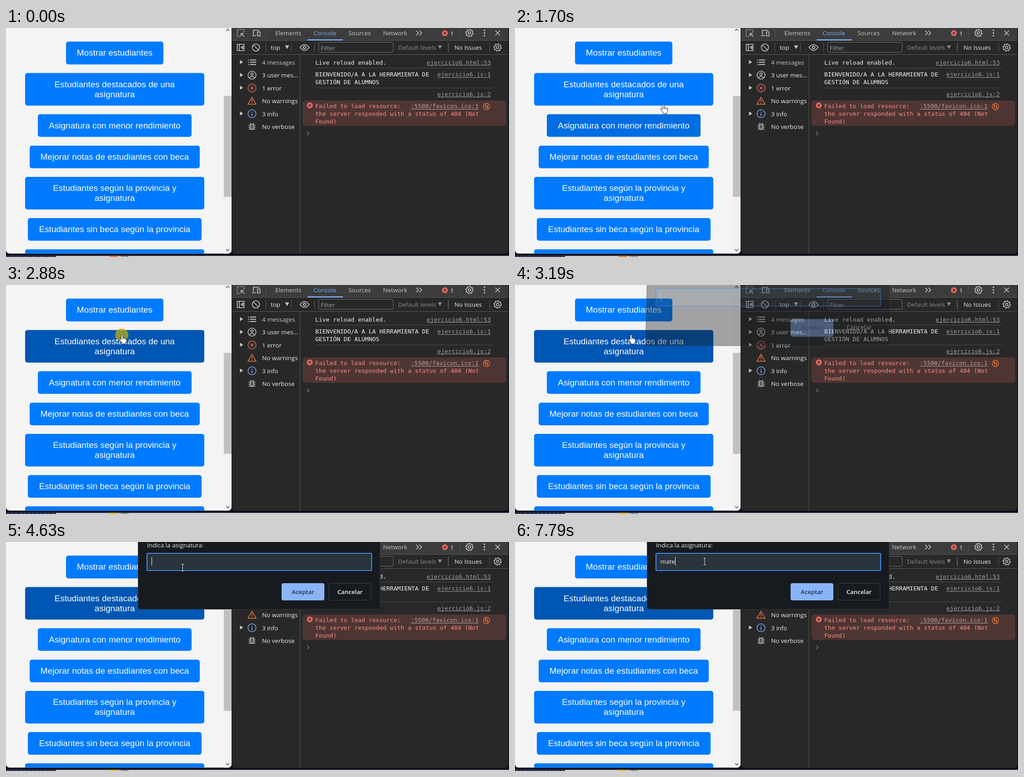
These frames come from a looping animation (1106 by 506 pixels, 8000 ms). An HTML page with a canvas:

```html
<!DOCTYPE html>
<html lang="es">
<head>
<meta charset="utf-8">
<title>Consola</title>
<style>
  html, body { margin: 0; width: 100%; height: 100%; overflow: hidden; background: #0b1020; }
  canvas { display: block; }
</style>
</head>
<body>
<canvas id="stage" width="1106" height="506"></canvas>
<script>
const ctx = document.getElementById('stage').getContext('2d', { alpha: false });
const LOOP = 8000;
const PAGE = '18.95px "Liberation Sans", Arial, sans-serif';
const UI = '13.4px "Open Sans", "Noto Sans", sans-serif';
const UI_BOLD = '600 13.2px "Open Sans", "Noto Sans", sans-serif';
const MONO = '13px "DejaVu Sans Mono", "Noto Sans Mono", monospace';

const clamp = v => Math.min(1, Math.max(0, v));

// Linear interpolation through [time, ...values] keys.
function track(keys, t) {
  if (t <= keys[0][0]) return keys[0].slice(1);
  for (let i = 1; i < keys.length; i++) {
    const a = keys[i - 1], b = keys[i];
    if (t < b[0]) {
      const k = (t - a[0]) / (b[0] - a[0]);
      return a.slice(1).map((v, j) => v + (b[j + 1] - v) * k);
    }
  }
  return keys[keys.length - 1].slice(1);
}

function rect(x, y, w, h, color) {
  ctx.fillStyle = color;
  ctx.fillRect(x, y, w, h);
}

function rounded(x, y, w, h, r, fill, stroke, width = 1) {
  ctx.beginPath();
  ctx.roundRect(x, y, w, h, r);
  if (fill) { ctx.fillStyle = fill; ctx.fill(); }
  if (stroke) { ctx.strokeStyle = stroke; ctx.lineWidth = width; ctx.stroke(); }
}

function text(str, x, y, font, color, align = 'left') {
  ctx.font = font;
  ctx.fillStyle = color;
  ctx.textAlign = align;
  ctx.fillText(str, x, y);
}

function shape(d, x, y, { fill, stroke, width = 1.5 }) {
  const path = new Path2D(d);
  ctx.save();
  ctx.translate(x, y);
  if (fill) { ctx.fillStyle = fill; ctx.fill(path); }
  if (stroke) { ctx.strokeStyle = stroke; ctx.lineWidth = width; ctx.stroke(path); }
  ctx.restore();
}

function circle(x, y, r, fill, stroke, width = 1.5) {
  ctx.beginPath();
  ctx.arc(x, y, r, 0, Math.PI * 2);
  if (fill) { ctx.fillStyle = fill; ctx.fill(); }
  if (stroke) { ctx.strokeStyle = stroke; ctx.lineWidth = width; ctx.stroke(); }
}

/* ---------- page ---------- */

const buttons = [
  { x: 132, y: 30, w: 214, h: 50.5, lines: ['Mostrar estudiantes'] },
  { x: 42, y: 99.5, w: 394, h: 72, lines: ['Estudiantes destacados de una', 'asignatura'],
    hover: [[1700, 0], [2000, 1], [2060, 1], [2300, .25], [2360, .25], [2700, 1]] },
  { x: 70, y: 190.5, w: 338, h: 50, lines: ['Asignatura con menor rendimiento'],
    hover: [[1575, 0], [1690, .4], [1700, .38], [1810, 0]] },
  { x: 52, y: 260, w: 374, h: 50, lines: ['Mejorar notas de estudiantes con beca'] },
  { x: 42, y: 329, w: 394, h: 72, lines: ['Estudiantes según la provincia y', 'asignatura'] },
  { x: 48, y: 420, w: 382, h: 50, lines: ['Estudiantes sin beca según la provincia'] },
  { x: 42, y: 489, w: 394, h: 72, lines: [] }
];

function drawPage(t, cursor) {
  ctx.save();
  ctx.beginPath();
  ctx.roundRect(0, -10, 496, 508.5, [0, 0, 8, 8]);
  ctx.clip();
  rect(0, 0, 496, 499, '#f4f4f4');
  for (const b of buttons) {
    const k = b.hover ? track(b.hover, t)[0] : 0;
    rounded(b.x, b.y, b.w, b.h, 5, `rgb(0,${123 - 37 * k},${255 - 76 * k})`);
    const middle = b.y + b.h / 2 + 6.2;
    b.lines.forEach((line, i) =>
      text(line, 239, middle + (i - (b.lines.length - 1) / 2) * 21.7, PAGE, '#fff', 'center'));
  }
  const onBar = t > 600 && t < 1200 && cursor.x > 479 && cursor.x < 496;
  rect(479, 0, 17, 499, '#f1f1f1');
  rect(479, 150, 17, 223, onBar ? '#a8a8a8' : '#c1c1c1');
  shape('M-3.5 2L0-1.5L3.5 2', 487.5, 4, { stroke: '#505050' });
  shape('M-3.5-2L0 1.5L3.5-2', 487.5, 491, { stroke: '#505050' });
  ctx.restore();
}

/* ---------- developer tools ---------- */

const INK = '#c7c7c7', BRIGHT = '#ececec', BLUE = '#7cacf8', LINE = '#5a5a5a', RED = '#e46962';
const ORANGE = '#ec7a3c';
const triangleDown = 'M-4.5-4H4.5L0 4Z';

function gear(x, y) {
  ctx.beginPath();
  for (let i = 0; i < 32; i++) {
    const r = i % 4 < 2 ? 8.3 : 6.4, a = (i + .5) * Math.PI / 16;
    ctx.lineTo(x + r * Math.cos(a), y + r * Math.sin(a));
  }
  ctx.closePath();
  ctx.strokeStyle = INK;
  ctx.lineWidth = 1.5;
  ctx.stroke();
  circle(x, y, 2.7, null, INK);
}

function errorBadge(x, y, r) {
  circle(x, y, r, RED);
  shape('M-2.5-2.5L2.5 2.5M2.5-2.5L-2.5 2.5', x, y, { stroke: '#332a2a', width: 1.4 });
}

function link(str, right, y, color) {
  text(str, right, y, MONO, color, 'right');
  const w = ctx.measureText(str).width;
  rect(right - w, Math.round(y + 1.5), w, 1, color);
}

function drawToolbars() {
  rect(497, 0, 608, 27, '#3c3c3c');
  rect(497, 27, 608, 1, LINE);
  rect(497, 58, 608, 1, LINE);

  const line = { stroke: INK, width: 1.6 };
  ctx.setLineDash([2.4, 2]);
  shape('M-1 7.5H-7.5V-7.5H7.5V-1', 516, 11, line);
  ctx.setLineDash([]);
  shape('M8 8L1 1M1 7V1H7', 516, 11, line);
  shape('M-6 4V-6H7M-9 6H0M3-2.5H8.5V6.5H3Z', 550, 11, line);
  rect(571, 2, 1, 18, LINE);
  text('Elements', 592, 16, UI, INK);
  text('Console', 676, 16, UI, BLUE);
  rect(663, 25, 78, 2.5, BLUE);
  text('Sources', 753, 16, UI, INK);
  text('Network', 829, 16, UI, INK);
  shape('M-6-5L-1 0L-6 5M1-5L6 0L1 5', 908, 11, line);
  errorBadge(965, 11.5, 6.5);
  text('1', 977, 16.5, UI, BRIGHT);
  rect(997, 2, 1, 18, LINE);
  gear(1019, 11);
  [-6, 0, 6].forEach(d => circle(1052, 11 + d, 1.7, INK));
  shape('M-5-5L5 5M5-5L-5 5', 1081, 11, line);

  shape('M-7.5-7H7.5V7H-7.5ZM-3-7V7M5-3L1 0L5 3Z', 516, 43, line);
  circle(549.5, 43, 8, null, INK, 1.6);
  shape('M-5.5-5.5L5.5 5.5', 549.5, 43, line);
  text('top', 582, 48, UI, BRIGHT);
  shape(triangleDown, 618, 42.5, { fill: INK });
  for (const x of [571, 627, 678, 1063]) rect(x, 33, 1, 20, LINE);
  rect(972, 33, 1, 20, '#858585');
  shape('M-10 0Q0-13 10 0Q0 13-10 0Z', 656.5, 43, line);
  circle(656.5, 43, 2.8, null, INK, 1.8);
  rounded(687.5, 31.5, 164, 22, 4, null, '#757575');
  text('Filter', 692, 48.5, UI, '#a0a0a0');
  text('Default levels', 862, 48, UI, '#8a8a8a');
  shape(triangleDown, 954, 42.5, { fill: '#8a8a8a' });
  text('No Issues', 986, 48, UI, BRIGHT);
  gear(1081, 43);
}

const sidebar = [
  ['4 messages', true, y => {
    for (const d of [-5, 0, 5]) {
      rect(532, y + d - 1, 2, 2, INK);
      rect(536, y + d - 1, 14, 2, INK);
    }
  }],
  ['3 user mes...', true, y => {
    circle(541, y, 8.8, null, INK);
    circle(541, y - 2.3, 2.7, null, INK);
    shape('M-6 6Q0-.5 6 6', 541, y, { stroke: INK });
  }],
  ['1 error', true, y => {
    circle(541, y, 8.8, null, RED);
    shape('M-3.3-3.3L3.3 3.3M3.3-3.3L-3.3 3.3', 541, y, { stroke: RED });
  }],
  ['No warnings', false, y => {
    shape('M0-8L9 7.5H-9ZM0-3V2.5M0 4V5.7', 541, y, { stroke: ORANGE });
  }],
  ['3 info', true, y => {
    circle(541, y, 8.8, null, BLUE);
    shape('M0-1V5M0-4.5V-2.7', 541, y, { stroke: BLUE, width: 1.8 });
  }],
  ['No verbose', false, y => {
    shape('M-3.5-3Q0-8 3.5-3V4Q0 9-3.5 4ZM-7.5-3.5H-3.5M3.5-3.5H7.5M-7.5 1H-3.5M3.5 1H7.5M-7.5 5.5H-3.5M3.5 5.5H7.5M-4-8L-2-5.5M4-8L2-5.5M-1.5-1H1.5M-1.5 3H1.5',
      541, y, { stroke: INK, width: 1.6 });
  }]
];

function drawConsole() {
  rect(646, 58, 1, 441, LINE);
  sidebar.forEach(([label, arrow, icon], i) => {
    const y = 75.7 + i * 28.45;
    if (arrow) shape('M-3-4.5L4 0L-3 4.5Z', 517.5, y - .5, { fill: INK });
    icon(y);
    text(label, 563, y + 5, UI, i ? BRIGHT : INK);
  });

  for (const y of [88, 132]) rect(680, y, 391, 1, '#4c4c4c');
  text('Live reload enabled.', 680, 80.5, MONO, '#f0f0f0');
  text('BIENVENIDO/A A LA HERRAMIENTA DE', 680, 107, MONO, '#f0f0f0');
  text('GESTIÓN DE ALUMNOS', 680, 123.8, MONO, '#f0f0f0');
  link('ejercicio6.html:53', 1066, 80.5, '#9e9e9e');
  link('ejercicio6.js:1', 1066, 107, '#9e9e9e');
  link('ejercicio6.js:2', 1066, 150.5, '#9e9e9e');

  rounded(652, 160, 448, 56, 6, '#4e3534');
  errorBadge(668, 171, 6.5);
  ['Failed to load resource:', 'the server responded with a status of 404 (Not', 'Found)']
    .forEach((s, i) => text(s, 680, 177 + i * 17, MONO, '#fa8c7f'));
  link(':5500/favicon.ico:1', 1039, 177, '#b3a3a2');
  circle(1056.5, 173.5, 7, null, ORANGE, 1.4);
  shape('M-2 3.5V-3.5M-4-1.5L-2-3.5L0-1.5M2-3.5V3.5M4 1.5L2 3.5L0 1.5', 1056.5, 173.5, { stroke: ORANGE, width: 1.3 });
  shape('M-2.5-4L2 0L-2.5 4', 664.5, 233, { stroke: '#62779f', width: 1.6 });
}

function drawDevTools() {
  ctx.save();
  ctx.beginPath();
  ctx.roundRect(497, -10, 607.5, 509, [0, 0, 8, 8]);
  ctx.clip();
  rect(497, 0, 608, 500, '#282828');
  drawToolbars();
  drawConsole();
  ctx.restore();
}

function drawDesktop(t) {
  rect(0, 0, 1106, 506, '#0b1020');
  rect(0, 503, 110, 3, '#2b3050');
  for (let x = 3; x < 108; x += 9) rect(x, 503 + x % 2, 4, 1, '#676c88');
  rect(110, 503.5, 996, 3, '#d4d4d8');
  rect(228, 503, 18, 3, t < 2880 ? '#d9743a' : '#e0a832');
  text('task', 252, 509, '10px "Liberation Sans", sans-serif', '#3a3a3a');
}

/* ---------- prompt ---------- */

const typed = [[6370, 'm'], [6520, 'ma'], [6970, 'mae'], [7310, 'ma'], [7440, 'mat'], [7790, 'mate']];
const caretSpans = [[3100, 3660], [4190, 4720], [5400, 5930], [6370, LOOP]];
const field = [310, 25, 494, 38, 2];
const accept = [606, 91, 94, 38, 4];

function drawPrompt(t) {
  if (t < 3100) return;
  const p = clamp((t - 3100) / 240);
  const flare = 6 * (1 - p);
  ctx.save();
  ctx.globalAlpha = p;
  ctx.translate(0, -29 * (1 - p));
  ctx.scale(1, 1 + .04 * (1 - p));

  const panel = new Path2D();
  panel.moveTo(290.5, -5);
  panel.lineTo(290.5 - flare, 144);
  panel.quadraticCurveTo(290.5 - flare, 148.5, 295 - flare, 148.5);
  panel.lineTo(818 + flare, 148.5);
  panel.quadraticCurveTo(822.5 + flare, 148.5, 822.5 + flare, 144);
  panel.lineTo(822.5, -5);
  ctx.strokeStyle = '#484c50';
  ctx.lineWidth = 1;
  ctx.stroke(panel);
  // Openings keep the fade even where the controls cover the panel.
  panel.closePath();
  panel.roundRect(...field);
  panel.roundRect(...accept);
  ctx.fillStyle = '#171b1f';
  ctx.fill(panel, 'evenodd');

  text('Indica la asignatura:', 310, 12, UI, '#e8eaed');
  rounded(...field, '#29343c', '#3f86ea', 2.2);
  rounded(...accept, '#8ab4f8');
  text('Aceptar', 653, 114.5, UI_BOLD, '#20304d', 'center');
  rounded(710, 91.5, 93, 37, 4, null, '#3c434a');
  text('Cancelar', 756.5, 114.5, UI_BOLD, '#f1f3f4', 'center');

  const entry = typed.filter(([at]) => t >= at).pop();
  const value = entry ? entry[1] : '';
  text(value, 319.5, 48, UI, '#f1f3f4');
  if (caretSpans.some(([from, to]) => t >= from && t < to)) {
    const x = Math.round(320 + ctx.measureText(value).width);
    rect(x, 33, 1, 19, '#fff');
  }
  ctx.restore();
}

/* ---------- pointer ---------- */

const path = [
  [600, 971, 496], [780, 790, 412], [1000, 530, 296], [1100, 450, 264], [1200, 417, 249],
  [1560, 417, 249], [1700, 326, 169], [1950, 262, 112], [2150, 254, 88], [2350, 255, 109.5],
  [4080, 255, 110], [4300, 300, 95], [4600, 385, 58], [4880, 417, 43]
];
const HAND = 'M-1.8 1.2Q0-1.4 1.8 1.2V7.5Q3.8 5.8 5 8Q6.8 6.6 8 8.8Q9.8 8 10 10.5V14Q9.5 17 8 18.5V20.5H0V18.5L-4.5 12.5Q-6.3 9.8-4.5 9.2Q-3.2 9-1.8 11Z';
const ARROW = 'M0 0V16L3.7 12.4L6.2 18L8.6 17L6.2 11.5H11.3Z';
const BEAM = 'M-3-7.5H-1L0-6.5L1-7.5H3M0-6.5V6.5M-3 7.5H-1L0 6.5L1 7.5H3';
const CLICK = 'rgba(200,180,0,.7)';

const inside = (c, b) => c.x >= b.x && c.x <= b.x + b.w && c.y >= b.y && c.y <= b.y + b.h;

function drawPointer(t, c) {
  if (t >= 2880 && t < 2920) circle(254.5, 110.5, 14.5, CLICK);
  if (t >= 5140 && t < 5350) circle(414.5, 42.5, 14.5, CLICK);
  if (t < 600) return;
  const modal = t > 4080;
  const [x, y, w, h] = field;
  if (modal && inside(c, { x, y, w, h })) {
    shape(BEAM, c.x, c.y, { stroke: '#11161a', width: 2.6 });
    shape(BEAM, c.x, c.y, { stroke: '#f2f2f2', width: 1.1 });
    return;
  }
  const hand = !modal && buttons.some(b => inside(c, b));
  shape(hand ? HAND : ARROW, c.x, c.y, { fill: '#fff', stroke: '#15192b', width: 1 });
  if (hand) shape('M1.8 7.5V11M5 8V11M8 8.8V11.5', c.x, c.y, { stroke: '#15192b', width: .8 });
}

function frame() {
  const t = performance.now() % LOOP;
  const [x, y] = track(path, t);
  const cursor = { x, y };
  drawDesktop(t);
  drawPage(t, cursor);
  drawDevTools();
  drawPrompt(t);
  drawPointer(t, cursor);
  requestAnimationFrame(frame);
}
frame();
</script>
</body>
</html>
```
